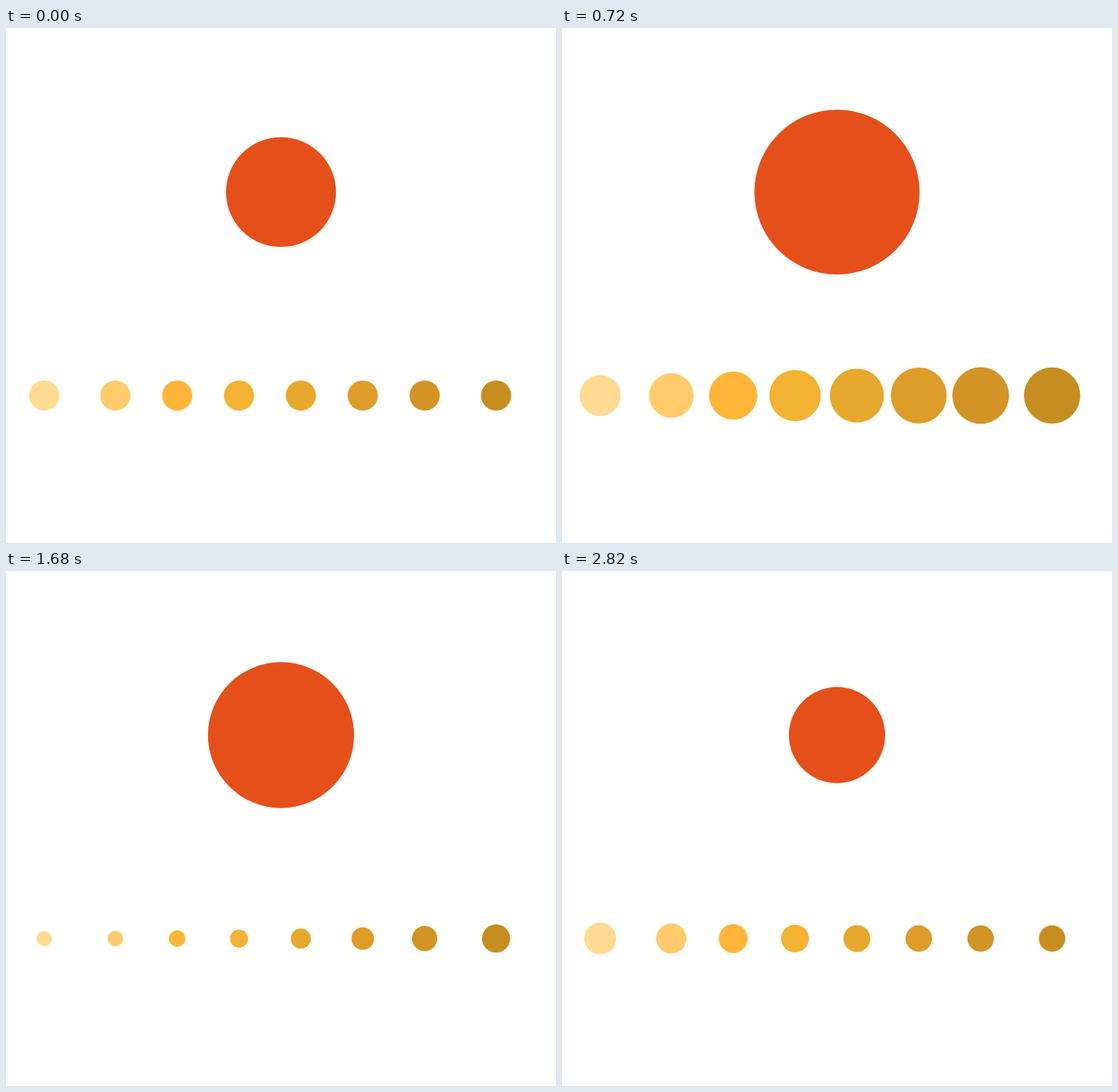
Write an HTML page with a canvas that moves like this. It is 773 by 725 pixels and loops after 2.85 s.

```html
<!DOCTYPE html>
<html lang="en">
<head>
<meta charset="utf-8">
<title>Pulsing dots</title>
<style>
  html, body { margin: 0; width: 100%; height: 100%; overflow: hidden; background: #fff; }
  canvas { display: block; }
</style>
</head>
<body>
<canvas id="stage" width="773" height="725"></canvas>
<script>
const ctx = document.getElementById('stage').getContext('2d');
const LOOP = 2850, TICK = 30;

// Scale keys as [ms, scale], eased with a smoothstep between them
const KEYS = [[506, 1], [995, 1.875], [1681, 0.5], [2372, 1.5], [3066, 0.875]];

// Each dot runs 45 ms ahead of its left neighbour, the big disc 510 ms
const STEP = 45, BIG_LEAD = 510;
const DOTS = [
  [53.7, '#ffda91'], [153.7, '#ffcb6c'], [240.6, '#ffb638'], [327.5, '#f4b233'],
  [414.4, '#e6a82d'], [501.4, '#de9c29'], [588.4, '#d29424'], [688.8, '#c68e20']
];

function scaleAt(u) {
  if (u <= KEYS[0][0]) return KEYS[0][1];
  for (let i = 1; i < KEYS.length; i++) {
    const [t0, a] = KEYS[i - 1], [t1, b] = KEYS[i];
    if (u < t1) {
      const x = (u - t0) / (t1 - t0);
      return a + (b - a) * x * x * (3 - 2 * x);
    }
  }
  return KEYS[KEYS.length - 1][1];
}

function disc(x, y, r, color) {
  ctx.fillStyle = color;
  ctx.beginPath();
  ctx.arc(x, y, r, 0, Math.PI * 2);
  ctx.fill();
}

function draw(t) {
  ctx.fillStyle = '#fff';
  ctx.fillRect(0, 0, 773, 725);
  disc(386.5, 231, 77.3 * scaleAt(t + BIG_LEAD), '#e5501a');
  DOTS.forEach(([x, color], i) => disc(x, 517.4, 21.25 * scaleAt(t + STEP * i), color));
}

const start = performance.now();
function frame() {
  const t = (performance.now() - start) % LOOP;
  draw(Math.floor(t / TICK) * TICK);
  requestAnimationFrame(frame);
}
frame();
</script>
</body>
</html>
```
